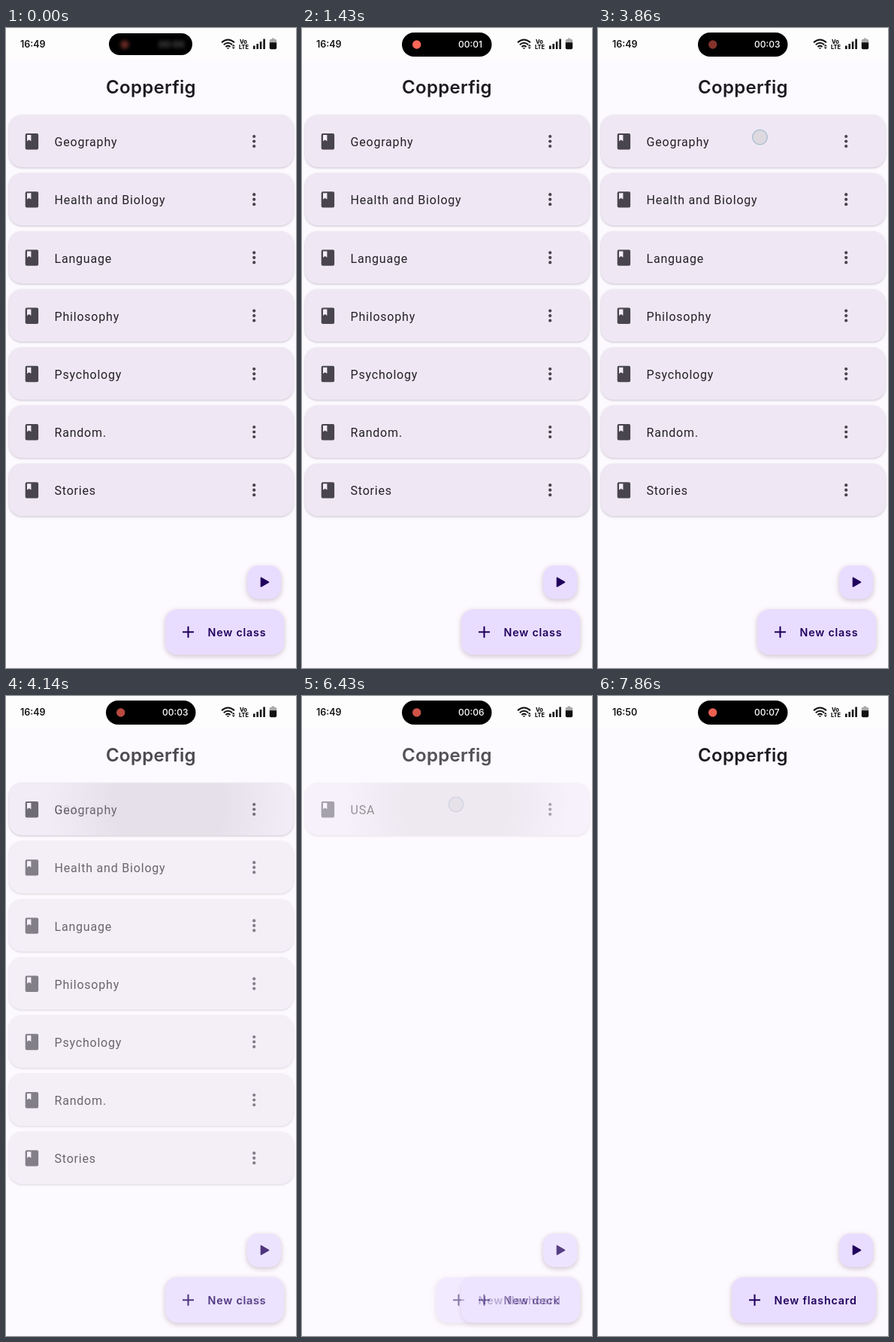
An HTML page that plays this animation: 386x850 px, repeating every 8 s.

```html
<!DOCTYPE html>
<html lang="en">
<head>
<meta charset="utf-8">
<title>Study classes</title>
<style>
  html, body { margin: 0; width: 100%; height: 100%; overflow: hidden; background: #fdfaff; }
  svg { display: block; width: 100vw; height: 100vh; }
  text { font-family: Inter, sans-serif; }
  .title { font-size: 24px; font-weight: 600; letter-spacing: .3px; fill: #1d1b20; text-anchor: middle; }
  .label { font-family: Roboto, sans-serif; font-size: 16px; letter-spacing: .8px; fill: #242127; }
  .action { font-size: 14.3px; font-weight: 600; letter-spacing: .8px; fill: #21005d; }
  .card { fill: #efe8f4; filter: drop-shadow(0 1px 1.8px rgba(60, 50, 75, .28)); }
  .button { fill: #e8ddff; filter: drop-shadow(0 2px 3.5px rgba(80, 40, 65, .27)); }
  .ink { fill: #49454f; }
  .clock { font-size: 12.5px; font-weight: 600; fill: #151515; }
  .timer { font-size: 12px; font-weight: 500; fill: #fff; }
  .volte { font-size: 7.4px; font-weight: 800; fill: #151515; text-anchor: middle; }
</style>
</head>
<body>
<svg viewBox="0 0 386 850" preserveAspectRatio="none">
  <defs>
    <clipPath id="firstCard"><rect x="4" y="115.5" width="378.5" height="69.5" rx="17"/></clipPath>
    <radialGradient id="rippleInk">
      <stop offset=".45" stop-color="#5a5558" stop-opacity=".12"/>
      <stop offset="1" stop-color="#5a5558" stop-opacity="0"/>
    </radialGradient>
    <filter id="soften" x="-50%" y="-50%" width="200%" height="200%"><feGaussianBlur id="blur"/></filter>
  </defs>
  <rect width="386" height="850" fill="#fdfaff"/>
  <g id="pages"></g>
  <circle id="touch" r="9.8" fill="#ded9df" stroke="#b2c1d6" stroke-width="1.5"/>

  <rect width="386" height="42" fill="#fcfdfc"/>
  <text id="clock" class="clock" x="19" y="25.5"></text>
  <rect id="island" fill="#000"/>
  <g id="recording">
    <circle id="dot" cy="22" r="5.7"/>
    <text id="timer" class="timer" y="26.3"></text>
  </g>
  <path d="M287 19.3Q295.5 11.6 304 19.3M289.8 22.3Q295.5 17.2 301.2 22.3M292.4 25Q295.5 22.2 298.6 25" fill="none" stroke="#151515" stroke-width="2"/>
  <path d="M293.7 26.2h3.6l-1.8 2zM300.8 24.2l2-2.4 2 2.4zM300.8 25.6l2 2.4 2-2.4z" fill="#151515"/>
  <text class="volte" x="316" y="20.5">Vo</text>
  <text class="volte" x="316.4" y="27.6">LTE</text>
  <path d="M329 23.5h2.6V28H329zM333.4 21h2.6v7h-2.6zM337.8 18h2.6v10h-2.6zM342.3 14.5h2.6V28h-2.6z" fill="#151515"/>
  <path d="M353 14.8h1v-1.2h3v1.2h1.2a2 2 0 0 1 2 2V20h-9.4v-3.2a2 2 0 0 1 2.2-2z" fill="#aaa"/>
  <path d="M350.8 19.3h9.4v6.9a2 2 0 0 1-2 2h-5.4a2 2 0 0 1-2-2z" fill="#111"/>
</svg>
<script>
const LOOP = 8000, FPS = 7;
const $ = id => document.getElementById(id);
const clamp = x => Math.max(0, Math.min(1, x));
const ramp = (t, from, to) => clamp((t - from) / (to - from));
const mix = (a, b, p) => a + (b - a) * p;
const set = (el, attrs) => Object.entries(attrs).forEach(([k, v]) => el.setAttribute(k, v));

const row = (name, i) => `<g transform="translate(0 ${i * 77.2})">
  <rect class="card" x="4" y="115.5" width="378.5" height="69.5" rx="17"/>
  <rect class="ink" x="25.7" y="140" width="17.4" height="21.4" rx="2"/>
  <path d="M28 142h5.4v8.3l-2.7-1.8-2.7 1.8z" fill="#f4eef9"/>
  <text class="label" x="64.5" y="157.3">${name}</text>
  ${[144, 150.5, 157].map(y => `<circle class="ink" cx="330.2" cy="${y}" r="2.1"/>`).join('')}
</g>`;

const page = ({ rows, action, left }) => `<g>
  <text class="title" x="193" y="87">Copperfig</text>
  ${rows.map(row).join('')}
  <g clip-path="url(#firstCard)"><circle class="ripple" r="0" fill="url(#rippleInk)"/></g>
  <rect class="button" x="321" y="714" width="45" height="44.5" rx="15"/>
  <path d="M339.5 730.2v11.6l10-5.8z" fill="#21005d" stroke="#21005d" stroke-width="1.6" stroke-linejoin="round"/>
  <rect class="button" x="${left}" y="772" width="${370 - left}" height="60.5" rx="16"/>
  <path d="M${left + 23} 802.3h15m-7.5-7.5v15" stroke="#21005d" stroke-width="2.1"/>
  <text class="action" x="${left + 56.5}" y="808">${action}</text>
</g>`;

const screens = [
  { rows: ['Geography', 'Health and Biology', 'Language', 'Philosophy', 'Psychology', 'Random.', 'Stories'],
    action: 'New class', left: 212 },
  { rows: ['USA'], action: 'New deck', left: 212 },
  { rows: [], action: 'New flashcard', left: 178 }
];
const taps = [
  { x: 215.5, y: 145, down: 3720, up: 3960, fade: [4070, 4300] },
  { x: 205, y: 144, down: 6110, up: 6330, fade: [6310, 6540] }
];

// Earlier screens lie on top of later ones.
$('pages').innerHTML = [...screens].reverse().map(page).join('');
const pages = [...$('pages').children].reverse();
const ripples = pages.map(p => p.querySelector('.ripple'));

function drawPages(t) {
  const shown = taps.map(tap => ramp(t, ...tap.fade));
  pages.forEach((el, i) => {
    const opacity = (i ? shown[i - 1] : 1) * (1 - (shown[i] ?? 0));
    set(el, { opacity, visibility: opacity ? 'visible' : 'hidden' });
  });
  taps.forEach(({ x, y, up, fade }, i) => {
    const start = up - 70;
    set(ripples[i], { cx: x, cy: y, r: 160 * ramp(t, start, start + 180), opacity: t < fade[1] ? 1 : 0 });
  });
}

function drawTouch(t) {
  const tap = t < 5000 ? taps[0] : taps[1];
  const opacity = ramp(t, tap.down, tap.down + 70) * (1 - ramp(t, tap.up, tap.up + 180));
  set($('touch'), { cx: tap.x, cy: tap.y, opacity });
}

function drawStatus(t) {
  const open = 1 - (1 - ramp(t, 0, 420)) ** 2;
  const y = mix(7, 6, open), height = mix(29, 32, open);
  set($('island'), { x: mix(137, 133, open), y, width: mix(111, 119.5, open), height, rx: height / 2 });
  set($('dot'), { cx: mix(158, 152.7, open) });
  set($('timer'), { x: mix(203, 208, open) });
  set($('blur'), { stdDeviation: mix(2.8, 0, open) });
  set($('recording'), { opacity: mix(.42, 1, open), filter: open < 1 ? 'url(#soften)' : 'none' });

  const glow = .5 + .5 * Math.cos((t - 1430) / 1560 * 2 * Math.PI);
  const rgb = [[127, 252], [49, 103], [43, 88]].map(([a, b]) => Math.round(mix(a, b, glow)));
  set($('dot'), { fill: `rgb(${rgb})` });
  $('timer').textContent = '00:0' + Math.max(0, Math.floor((t - 285) / 1000));
  $('clock').textContent = t < 7400 ? '16:49' : '16:50';
}

function render(time) {
  const t = Math.floor((time % LOOP + 5) * FPS / 1000) * 1000 / FPS;
  drawPages(t);
  drawTouch(t);
  drawStatus(t);
}

const begin = performance.now();
function tick() {
  render(performance.now() - begin);
  requestAnimationFrame(tick);
}
tick();
</script>
</body>
</html>
```
